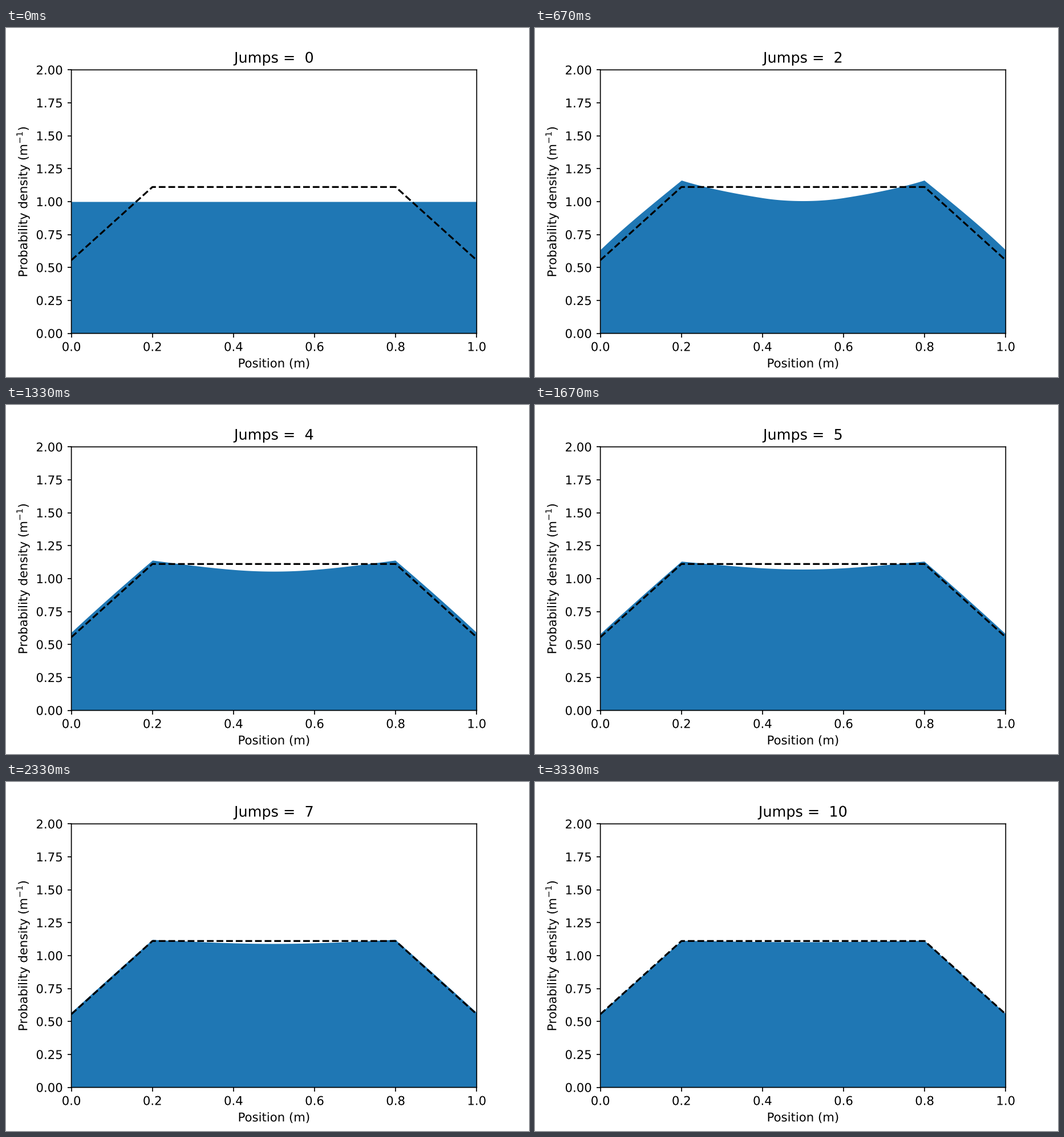
Write a matplotlib script that moves like this. It is 917 by 611 pixels and loops after 3.66 s.

```python
import numpy as np
import matplotlib.pyplot as plt
from matplotlib.animation import FuncAnimation
from matplotlib.patheffects import Normal
from matplotlib.text import Text

WIDTH, HEIGHT = 917, 611
DPI = WIDTH / 6
LOOP_MS, TICK_MS = 3660, 20
JUMPS = 10
CELLS = 1000
REACH = 200  # longest jump, in cells

plt.rcParams.update({"font.family": "DejaVu Sans", "font.size": 10,
                     "text.hinting": "none"})

index = np.arange(CELLS)
x = index / CELLS
low = np.maximum(index - REACH, 0)
high = np.minimum(index + REACH + 1, CELLS)


def jump(density):
    """Spread each cell evenly over the part of its reach inside the box."""
    total = np.concatenate(([0], np.cumsum(density / (high - low))))
    return total[high] - total[low]


def title_text(count):
    return f"Jumps =  {count}"


# The tiny margin keeps float truncation from losing a pixel.
fig = plt.figure(figsize=((WIDTH + 1e-6) / DPI, (HEIGHT + 1e-6) / DPI),
                 dpi=DPI, facecolor="white")
fig.subplots_adjust(left=0.125, right=0.9, bottom=0.125, top=0.88)
ax = fig.add_subplot()
ax.set(xlim=(0, 1), ylim=(0, 2), xlabel="Position (m)",
       ylabel="Probability density (m$^{-1}$)",
       xticks=np.linspace(0, 1, 6), yticks=np.linspace(0, 2, 9))
for spine in ax.spines.values():
    spine.set_snap(False)

densities = [np.ones(CELLS)]
for _ in range(JUMPS):
    densities.append(jump(densities[-1]))
fills = [ax.fill_between(x, density, color="C0", linewidth=0)
         for density in densities]

peak = 0.4 / 0.36
ax.plot([0, 0.2, 0.8, 1], [peak / 2, peak, peak, peak / 2], "k--", lw=1.5)

title = ax.set_title(title_text(0))
# The starting title stays visible beneath the first jump's title.
ghost = ax.annotate(title_text(0), (0.5, 1), xycoords="axes fraction",
                    xytext=(0, 6), textcoords="offset points",
                    ha="center", va="baseline", fontsize=12)

# A path effect draws text as outlines, free of whole-pixel rounding.
for text in ax.findobj(Text):
    text.set_path_effects([Normal()])


def update(frame):
    count = min(JUMPS, int((frame * TICK_MS + 14) * 3 / 1000))
    for i, fill in enumerate(fills):
        fill.set_visible(i == count)
    title.set_text(title_text(count))
    ghost.set_visible(count == 1)
    return [*fills, title, ghost]


anim = FuncAnimation(fig, update, frames=LOOP_MS // TICK_MS,
                     interval=TICK_MS, repeat=True, repeat_delay=0)
plt.show()
```
